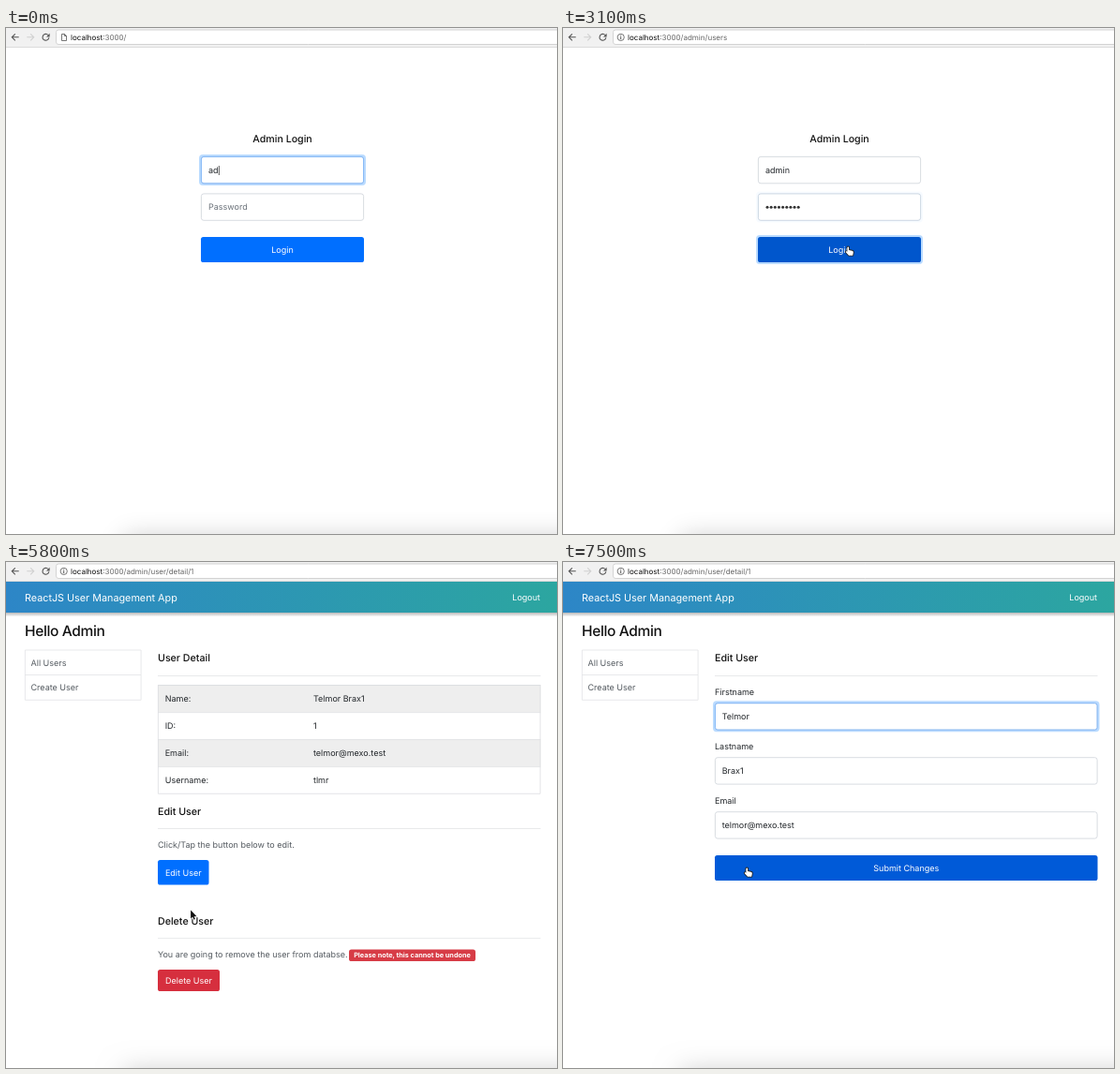
Animation of 588 by 540 pixels, one loop 7600 ms. Source, as an HTML page with a canvas:

```html
<!DOCTYPE html>
<html lang="en">
<head>
<meta charset="utf-8">
<title>User management demo</title>
<style>
  html, body { margin: 0; width: 588px; height: 540px; overflow: hidden; background: #fff; }
  canvas { display: block; }
</style>
</head>
<body>
<canvas id="stage" width="588" height="540"></canvas>
<script>
const ctx = document.getElementById('stage').getContext('2d');
const LOOP = 7600, STEP = 100;
const INK = '#212529', MUTED = '#555b61', LINE = '#e3e4e6', BLUE = '#006fff';
const LEFT = 162, WIDTH = 408.5;

const users = [
  ['Telmor Brax1', 'telmor@mexo.test'],
  ['Pell Orm', 'pell@zorbix.test'],
  ['Lorentha Tovell', 'ltova@nuvo.test'],
  ['gdfgdfgd fdfgdfgdgf', 'telmor1@mexo.test'],
  ['fdfgddfg fgdfgdfgdfgd', 'fdgfdg@gfdgfd.t']
];

// Pointer stops: time, x, y
const stops = [
  [2500, 330, 205], [2800, 306, 238], [3300, 306, 238], [3700, 370, 198], [3900, 370, 198],
  [4600, 209, 449], [5300, 209, 449], [6100, 196, 343], [7100, 196, 343], [7400, 198, 331]
];
const hand = new Path2D('M-2.6-3.7c0-1.2 1.7-1.2 1.7 0V-1l3.3.7c1.1.2 1.6.9 1.4 2l-.6 3H-1L-4 1.4c-.6-1 .6-1.7 1.2-.9l.2.3z');
const arrow = new Path2D('M-3-5v9l2.1-1.9 1.3 3 1.4-.6-1.3-2.9h2.9z');
const docIcon = new Path2D('M59.5 6.5h3l2 2v5h-5zM62.5 6.5v2h2');

let pointer, overButton;

const clamp = (v, a = 0, b = 1) => Math.min(b, Math.max(a, v));
const ramp = (t, a, b) => clamp((t - a) / (b - a));

function pointerAt(t) {
  if (t < stops[0][0]) return null;
  const next = stops.findIndex(s => s[0] > t);
  if (next < 0) return stops.at(-1).slice(1);
  const [t0, x0, y0] = stops[next - 1], [t1, x1, y1] = stops[next];
  const p = ramp(t, t0, t1), e = p * p * (3 - 2 * p);
  return [x0 + (x1 - x0) * e, y0 + (y1 - y0) * e];
}

// y is the middle of the capital letters
function text(str, x, y, { size = 9, weight = 400, color = INK, align = 'left', spacing = 0 } = {}) {
  ctx.font = `${weight} ${size}px Inter, "Open Sans", sans-serif`;
  ctx.letterSpacing = spacing + 'px';
  ctx.textAlign = align;
  ctx.fillStyle = color;
  ctx.fillText(str, x, y + size * 0.36);
}

const heading = (str, y) => text(str, LEFT, y, { size: 10.65, weight: 500, color: '#111' });

function box(x, y, w, h, fill, stroke, r = 2.6) {
  ctx.beginPath();
  ctx.roundRect(x, y, w, h, r);
  if (fill) { ctx.fillStyle = fill; ctx.fill(); }
  if (stroke) { ctx.strokeStyle = stroke; ctx.lineWidth = 0.8; ctx.stroke(); }
}

function rule(x, y, w, color = LINE) {
  ctx.fillStyle = color;
  ctx.fillRect(x, y, w, 0.8);
}

function ring(x, y, w, h, amount) {
  if (amount) box(x - 2, y - 2, w + 4, h + 4, `rgba(0,123,255,${0.27 * amount})`, null, 4);
}

function input(x, y, w, focus = 0) {
  ring(x, y, w, 29, focus);
  box(x + 0.4, y + 0.4, w - 0.8, 28.4, '#fff', '#ced4da');
  if (focus) box(x + 0.4, y + 0.4, w - 0.8, 28.4, null, `rgba(110,175,255,${focus})`);
}

function hovered(x, y, w, h) {
  if (!pointer) return false;
  const px = pointer[0] - 2, py = pointer[1] - 4;
  const hit = px >= x && px <= x + w && py >= y && py <= y + h;
  if (hit) overButton = true;
  return hit;
}

function button(label, x, y, w, h, color, hover, focus = 0) {
  ring(x, y, w, h, focus);
  box(x, y, w, h, hovered(x, y, w, h) ? hover : color);
  text(label, x + w / 2, y + h / 2 + 0.3, { color: '#fff', align: 'center' });
}

function caret(x, y) {
  ctx.fillStyle = '#333';
  ctx.fillRect(x, y - 5, 0.8, 10);
}

function strokePath(path, color, width) {
  ctx.strokeStyle = color;
  ctx.lineWidth = width;
  ctx.stroke(path);
}

function toolbar(path) {
  ctx.fillStyle = '#f1f1f1';
  ctx.fillRect(0, 0, 588, 20);
  rule(0, 20, 588, '#d2d2d2');
  box(53.5, 2, 560, 15.5, '#fff', '#c9c9c9');
  strokePath(new Path2D('M13.7 9.8H6.4M9.8 6.3L6.3 9.8l3.5 3.5'), '#555', 1.1);
  strokePath(new Path2D('M22.3 9.8h7.3M26.2 6.3l3.5 3.5-3.5 3.5'), '#d0d0d0', 1.1);
  ctx.beginPath();
  ctx.arc(42.5, 9.8, 3.4, 0.2, 5.5);
  ctx.strokeStyle = '#555';
  ctx.stroke();
  ctx.fillStyle = '#555';
  ctx.fill(new Path2D('M46.6 5.8v3.6H43z'));
  if (path === '/') {
    strokePath(docIcon, '#555', 0.8);
  } else {
    ctx.beginPath();
    ctx.arc(61.7, 9.9, 3.6, 0, 7);
    ctx.strokeStyle = '#555';
    ctx.lineWidth = 0.8;
    ctx.stroke();
    ctx.fillRect(61.2, 9.2, 1, 3);
    ctx.fillRect(61.2, 7.5, 1, 1);
  }
  text('localhost', 69, 10, { size: 8, color: '#111' });
  const hostWidth = ctx.measureText('localhost').width;
  text(':3000' + path, 69 + hostWidth, 10, { size: 8, color: '#666' });
}

function loginPage(t) {
  const x = 208, w = 174;
  const onPassword = t >= 700, pressed = t >= 3000;
  const nameFocus = 1 - ramp(t, 600, 800);
  const passFocus = ramp(t, 600, 800) * (1 - ramp(t, 2950, 3120));
  text('Admin Login', 295, 118.5, { size: 10.65, weight: 500, color: '#111', align: 'center' });

  const name = t < 100 ? 'ad' : t < 200 ? 'adm' : 'admin';
  input(x, 137, w, nameFocus);
  text(name, 216, 152);
  if (!onPassword) caret(216.3 + ctx.measureText(name).width, 152);

  const typed = t < 1800 ? clamp((t - 1000) / 100, 0, 6) : Math.min(9, 6 + (t - 1700) / 100);
  input(x, 176.5, w, passFocus);
  if (!typed) text('Password', 216, 191, { color: '#6a7179' });
  ctx.fillStyle = '#333';
  for (let i = 0; i < typed; i++) {
    ctx.beginPath();
    ctx.arc(218 + i * 4.15, 191.3, 1.5, 0, 7);
    ctx.fill();
  }
  if (onPassword && !pressed) caret(216.3 + typed * 4.15, 191);

  button('Login', x, 223, w, 27, BLUE, pressed ? '#0056cc' : '#0060e0', pressed ? 1 : 0);
}

function appFrame(activeList) {
  const shadow = ctx.createLinearGradient(0, 54, 0, 58.5);
  shadow.addColorStop(0, 'rgba(0,0,0,.28)');
  shadow.addColorStop(1, 'rgba(0,0,0,0)');
  ctx.fillStyle = shadow;
  ctx.fillRect(0, 54, 588, 4.5);
  const bar = ctx.createLinearGradient(0, 0, 588, 0);
  bar.addColorStop(0, '#2d86c7');
  bar.addColorStop(1, '#2ca6a0');
  ctx.fillStyle = bar;
  ctx.fillRect(0, 21, 588, 33);
  text('ReactJS User Management App', 20, 38, { size: 10.8, color: '#fff' });
  text('Logout', 570, 38, { color: '#fff', align: 'right' });
  text('Hello Admin', 20, 73, { size: 15.5, weight: 500, color: '#111', spacing: -0.35 });
  box(20.4, 94, 123.7, 53.3, '#fff', LINE, 0);
  rule(20, 120.2, 124);
  text('All Users', 26.5, 107.5, { color: activeList ? '#1d64ad' : MUTED });
  text('Create User', 26.5, 134, { color: MUTED });
  rule(LEFT, 121, WIDTH);
}

function listPage() {
  appFrame(true);
  heading('All Users (6)', 102.5);
  text('Click/Tap on a user to view and edit', LEFT, 138.3, { color: MUTED });
  users.forEach(([name, email], i) => {
    const y = 154.4 + i * 77.25;
    hovered(LEFT, y, WIDTH, 68);
    box(LEFT + 0.4, y, WIDTH - 0.8, 68, '#f6f6f6', '#d9d9d9');
    text(name, 171.3, y + 17.2, { size: 10.4, weight: 500, color: '#111' });
    text(email, 171.3, y + 34, { color: MUTED });
    text('ID: ' + (i + 1), 171.3, y + 50, { color: MUTED });
  });
}

function detailPage() {
  appFrame(false);
  heading('User Detail', 102.5);
  const rows = [['Name:', users[0][0]], ['ID:', '1'], ['Email:', users[0][1]], ['Username:', 'tlmr']];
  rows.forEach(([label, value], i) => {
    const y = 131.3 + i * 29;
    ctx.fillStyle = i % 2 ? '#fff' : '#eee';
    ctx.fillRect(LEFT, y, WIDTH, 29);
    rule(LEFT, y, WIDTH, '#dee0e3');
    text(label, 169.7, y + 14.8);
    text(value, 328, y + 14.8);
  });
  box(LEFT + 0.4, 131.5, WIDTH - 0.8, 115.8, null, '#dcdee1', 0);

  heading('Edit User', 266);
  rule(LEFT, 284, WIDTH);
  text('Click/Tap the button below to edit.', LEFT, 301.5, { color: MUTED });
  button('Edit User', LEFT, 318, 54.5, 26.5, BLUE, '#0063ea');

  heading('Delete User', 383);
  rule(LEFT, 401.3, WIDTH);
  text('You are going to remove the user from databse.', LEFT, 419, { color: MUTED });
  box(366, 413.5, 135, 12.5, '#d73c46');
  text('Please note, this cannot be undone', 433.5, 419.7, { size: 7.3, weight: 700, color: '#fff', align: 'center' });
  button('Delete User', LEFT, 435, 66, 23, '#d62f3e', '#b9202e');
}

function editPage(t) {
  appFrame(false);
  heading('Edit User', 102.5);
  const [first, last] = users[0][0].split(' ');
  [['Firstname', first], ['Lastname', last], ['Email', users[0][1]]].forEach(([label, value], i) => {
    const y = 138.3 + i * 58;
    text(label, LEFT, y);
    input(LEFT, y + 12, WIDTH, i ? 0 : ramp(t, 7000, 7250));
    text(value, 169.7, y + 26.7);
  });
  button('Submit Changes', LEFT, 313, WIDTH, 27, BLUE, '#005ad8');
}

function bottomShadow() {
  ctx.save();
  ctx.shadowColor = 'rgba(0,0,0,.2)';
  ctx.shadowBlur = 28;
  ctx.fillStyle = '#000';
  ctx.fillRect(126, 543, 700, 80);
  ctx.restore();
}

function drawPointer() {
  if (!pointer) return;
  const shape = overButton ? hand : arrow;
  ctx.save();
  ctx.translate(...pointer);
  ctx.lineJoin = 'round';
  strokePath(shape, overButton ? '#222' : '#fff', 1.8);
  ctx.fillStyle = overButton ? '#fff' : '#111';
  ctx.fill(shape);
  ctx.restore();
}

function draw(t) {
  ctx.textRendering = 'geometricPrecision';
  ctx.fillStyle = '#fff';
  ctx.fillRect(0, 0, 588, 540);
  pointer = pointerAt(t);
  overButton = false;
  toolbar(t < 3100 ? '/' : t < 3900 ? '/admin/users' : '/admin/user/detail/1');
  if (t < 3300) loginPage(t);
  else if (t < 3900) listPage();
  else if (t < 7100) detailPage();
  else editPage(t);
  bottomShadow();
  drawPointer();
}

const start = performance.now();
function frame() {
  const t = (performance.now() - start) % LOOP;
  draw(Math.floor(t / STEP) * STEP);
  requestAnimationFrame(frame);
}
frame();
</script>
</body>
</html>
```
